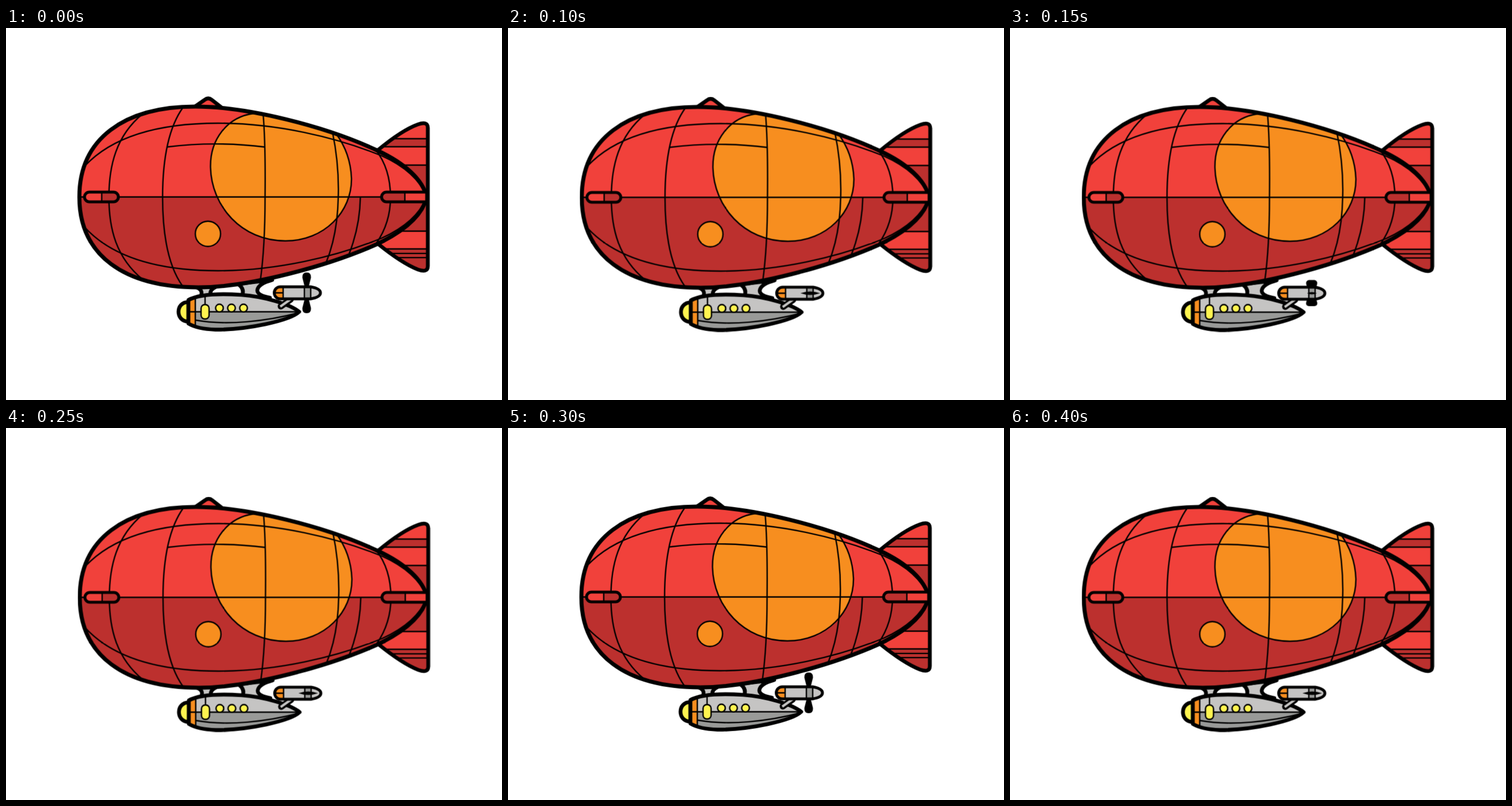
Recreate the animation shown at these times as an HTML page. Size 864 by 648 pixels, loop 0.45 s.

```html
<!DOCTYPE html>
<html lang="en">
<head>
<meta charset="utf-8">
<title>Airship</title>
<style>
html, body { margin: 0; width: 100%; height: 100%; overflow: hidden; background: #fff; }
svg { display: block; width: 100%; height: 100%; }
.red { fill: #f1413b; }
.dark { fill: #bc302e; }
.orange { fill: #f78e1f; }
.light { fill: #c5c4c3; }
.grey { fill: #999a98; }
.yellow { fill: #fff450; }
.none { fill: none; }
.line { stroke: #000; stroke-width: 2.4; }
.edge { stroke: #000; stroke-width: 6.6; stroke-linejoin: round; stroke-linecap: round; }
.hull { stroke-width: 7; }
.pill { stroke-width: 5; }

.ship, .tall, .short, .flat { animation: 450ms step-end infinite; }
.ship { animation-name: jitter; }
.tall { animation-name: tall; }
.short { animation-name: short; }
.flat { animation-name: flat; }

/* Nine 50 ms steps: tall short flat, short tall flat, tall short flat */
@keyframes tall {
  0%, 44.44%, 66.66% { visibility: visible; }
  11.11%, 55.55%, 77.77%, 100% { visibility: hidden; }
}
@keyframes short {
  0%, 22.22%, 44.44%, 88.88%, 100% { visibility: hidden; }
  11.11%, 33.33%, 77.77% { visibility: visible; }
}
@keyframes flat {
  0%, 33.33%, 66.66% { visibility: hidden; }
  22.22%, 55.55%, 88.88%, 100% { visibility: visible; }
}
@keyframes jitter {
  0%, 44.44%, 66.66% { transform: translate(-.3px, -.2px); }
  11.11%, 55.55%, 77.77%, 100% { transform: translate(.5px, .5px); }
}
</style>
</head>
<body>
<svg viewBox="0 0 864 648">
  <defs>
    <path id="hull" d="M128 294.5C128 193 206 137 330 137C420 137 557 171 648 214C695 236 726 264 733 294.5C726 327 695 353 648 376C563 414 425 452 335 452C206 452 128 396 128 294.5Z"/>
    <path id="fin" d="M648 213Q690 178 718 168Q735 162 735 174V415Q735 427 718 421Q690 410 648 376Z"/>
    <path id="cabin" d="M318 474C340 462 380 463 410 465C450 468 495 481 511 494.5C495 510 420 526 365 525.5C345 525 328 521 318 515Z"/>
    <path id="engine" d="M478 451H531Q548 454 548 461.5Q548 469 531 472H478A10.5 10.5 0 0 1 478 451Z"/>
    <path id="leftPill" d="M145.5 286H187.5A8.5 8.5 0 0 1 187.5 303H145.5A8.5 8.5 0 0 1 145.5 286Z"/>
    <path id="rightPill" d="M663 286H733V303H663A8.5 8.5 0 0 1 663 286Z"/>
    <path id="blade" d="M521 453L516.5 435Q516 426 524 426Q532 426 531.5 435L527 453Z"/>
    <clipPath id="inHull"><use href="#hull"/></clipPath>
    <clipPath id="inFin"><use href="#fin"/></clipPath>
    <clipPath id="inCabin"><use href="#cabin"/></clipPath>
    <clipPath id="inEngine"><use href="#engine"/></clipPath>
    <clipPath id="inLeft"><use href="#leftPill"/></clipPath>
    <clipPath id="inRight"><use href="#rightPill"/></clipPath>
  </defs>

  <g class="ship">
    <!-- Tail fin and top cap -->
    <g clip-path="url(#inFin)">
      <path class="red" d="M640 160H740V430H640Z"/>
      <path class="dark line" d="M630 193H750V207H630ZM630 239H750V354H630ZM630 385H750V393H630ZM630 400H750V440H630Z"/>
      <path class="dark" d="M630 394H750V399H630Z"/>
    </g>
    <use href="#fin" class="none edge"/>
    <path class="red edge" d="M328 138L346 125.5Q352.500 120 359 125.500L375 138Z"/>

    <!-- Struts -->
    <path class="light edge" d="M332 452Q345 457 339 468H358Q352 458 366 451Z"/>
    <path class="light edge" d="M404 446Q418 455 410 470L460 470Q438 466 438 457Q439 446 464 439Z"/>

    <!-- Hull -->
    <g clip-path="url(#inHull)">
      <path class="red" d="M120 130H740V295H120Z"/>
      <path class="dark" d="M120 294.5H740V460H120Z"/>
      <path class="orange line" d="M432 149C385 155 355.500 195 356.500 243C358 310 410 371 487 371C555 371 603 320 602 262C601 235 592 207 575 184L500 150Z"/>
      <g class="none line">
        <path d="M128 294.5H734"/>
        <path d="M138 240C190 185 275 166 370 166C470 166 575 190 655 223C695 241 722 266 731 291"/>
        <path d="M138 348C190 404 275 423 370 423C470 423 575 399 655 366C695 348 722 323 731 298"/>
        <path d="M238 150C192 188 179.500 240 179.500 295C179.500 350 192 400 238 438"/>
        <path d="M309 138C282 175 273 230 273 295C273 360 282 414 308 450"/>
        <path d="M448 148C452 195 452 250 451.500 295C451.500 360 449 400 443 442"/>
        <path d="M569 182C577 220 580 260 579 295C578 345 570 380 557 411"/>
        <path d="M617.500 295C617 330 611 361 597 396"/>
        <path d="M644 212C662 235 670 265 670 295C670 325 662 352 644 377"/>
        <path d="M280 207.500C340 200 400 201 451 207.500"/>
      </g>
    </g>
    <circle class="orange line" cx="352" cy="358.700" r="22"/>
    <use href="#hull" class="none edge hull"/>

    <!-- Side fins -->
    <g clip-path="url(#inLeft)">
      <path class="red" d="M130 280H167V310H130Z"/>
      <path class="dark line" d="M167 280H210V310H167Z"/>
    </g>
    <use href="#leftPill" class="none edge pill"/>
    <g clip-path="url(#inRight)">
      <path class="dark" d="M650 280H695V310H650Z"/>
      <path class="red line" d="M695 280H740V310H695Z"/>
    </g>
    <use href="#rightPill" class="none edge pill"/>

    <!-- Engine mount and cabin -->
    <path class="yellow edge" d="M318 477.500C295 477.500 295 511.500 318 511.500Z"/>
    <g clip-path="url(#inCabin)">
      <path class="light" d="M310 455H520V495H310Z"/>
      <path class="grey" d="M310 494.5H520V535H310Z"/>
      <path class="orange line" d="M310 455H330V535H310Z"/>
      <path class="none line" d="M318 494.5H512M330 509C385 519 455 511 511 496M347 460V483"/>
    </g>
    <use href="#cabin" class="none edge"/>
    <rect class="yellow line" x="340" y="482" width="14" height="25" rx="6.5"/>
    <g class="yellow line">
      <circle cx="372" cy="488" r="6.7"/>
      <circle cx="393" cy="488" r="6.7"/>
      <circle cx="414" cy="488" r="6.7"/>
    </g>
    <path class="none edge" style="stroke-width:11" d="M479 485L496 473"/>
    <path class="none" stroke="#c5c4c3" stroke-width="4" d="M478 485.500L497 472"/>

    <!-- Engine and propeller -->
    <g class="tall">
      <use href="#blade"/>
      <use href="#blade" transform="matrix(1 0 0 -1 0 923)"/>
    </g>
    <g clip-path="url(#inEngine)">
      <path class="light" d="M460 445H555V480H460Z"/>
      <path class="grey" d="M520 445H531V480H520Z"/>
      <path class="orange line" d="M460 445H483V480H460Z"/>
      <path class="none line" d="M468 461.5H483M520 445V480M531 445V480"/>
    </g>
    <use href="#engine" class="none edge pill"/>
    <g class="short">
      <path d="M520 438.500H530Q536 440 534.500 446L532 453H518L515.500 446Q514 440 520 438.500ZM518 470H532L534.500 477Q536 483 530 484H520Q514 483 515.500 477Z"/>
      <path d="M517 461.500Q525 457.500 534 461.500Q525 465.500 517 461.500Z"/>
    </g>
    <path class="flat" d="M509 461.500Q526 455.500 543 461.500Q526 467.500 509 461.500Z"/>
  </g>
</svg>
</body>
</html>
```
